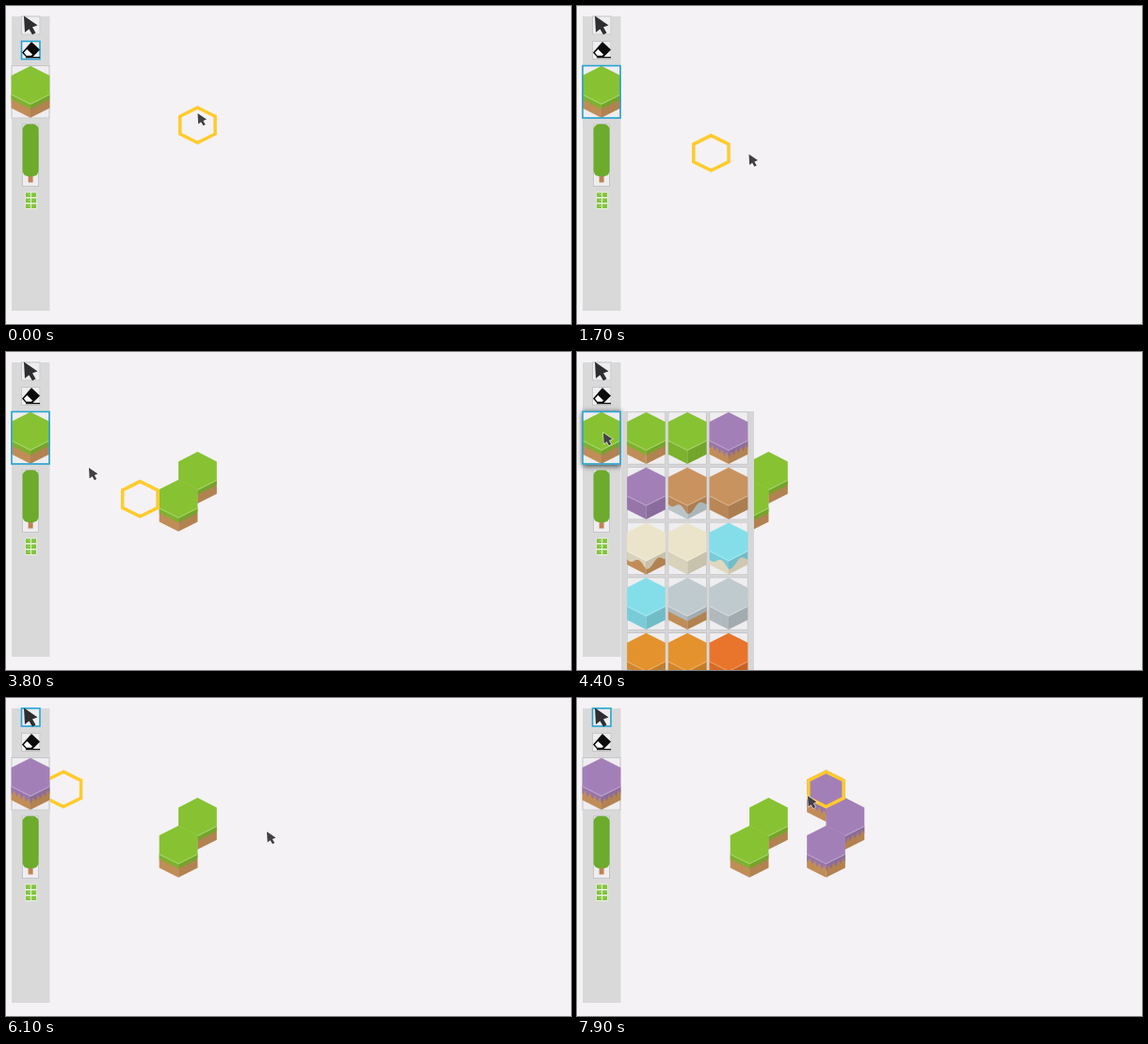
An HTML page with a canvas that plays this animation: 600x338 px, repeating every 8 s.

```html
<!DOCTYPE html>
<html>
<head>
<meta charset="utf-8">
<title>Hex tile editor</title>
<style>
html, body { margin: 0; width: 100%; height: 100%; overflow: hidden; background: #f4f2f5; }
canvas { display: block; }
</style>
</head>
<body>
<canvas id="stage" width="600" height="338"></canvas>
<script>
const ctx = document.getElementById('stage').getContext('2d');
const LOOP = 8000, STEP = 100;
const HALF = 20.35, QUARTER = 10.2, DEPTH = 14;
const BLUE = '#25a3d1';

const green = '#87c232', purple = '#a37fb8', brown = '#c9935f', cream = '#ebe4cb';
const cyan = '#84deea', gray = '#bfcacf', orange = '#e4922e', red = '#e9742b';
const soil = '#d2995f', ice = '#cbd6da', sand = '#f3ead2';

const tile = (top, base, lip) => ({ top, base, lip });
const GRASS = tile(green, soil, 'jag');
const HEATH = tile(purple, soil, 'drip');
const PALETTE = [
  GRASS, tile(green), HEATH,
  tile(purple), tile(brown, ice, 'wave'), tile(brown),
  tile(cream, soil, 'wave'), tile(cream), tile(cyan, sand, 'wave'),
  tile(cyan), tile(gray, soil, 'flat'), tile(gray),
  tile(orange, soil, 'drip'), tile(orange), tile(red)
];
const LIPS = {
  flat: () => 5,
  jag: x => 4.6 + 1.3 * Math.sin(x * 2.1),
  drip: x => 5 + 2.3 * Math.sin(x * 1.25 + 1),
  wave: x => 6 + 3.2 * Math.sin(x * 0.31 + 0.8)
};

// pointer: time, x, y
const PATH = [
  [0, 203.5, 114], [200, 160, 116], [400, 50, 98], [500, 30, 57], [600, 30, 125],
  [700, 24, 200], [1000, 37, 94], [1200, 36, 93], [1400, 70, 110], [1600, 150, 150],
  [1800, 215, 165], [2200, 185, 155], [2300, 198, 134], [2400, 197, 135], [2800, 202, 128],
  [3000, 194, 165], [3600, 166, 142], [3700, 140, 140], [3800, 88, 123], [4000, 42, 92],
  [4400, 28, 86], [4900, 112, 300], [5250, 189, 200], [5600, 160, 90], [5700, 160, 90],
  [6100, 277, 142], [6300, 264, 152], [6600, 284, 126], [6800, 264, 98], [7000, 185, 150],
  [7200, 208, 166], [7500, 284, 126], [7700, 262, 99], [7900, 245, 104]
];
// placed tiles, back to front: time, column, row, kind
const PLACED = [
  [6800, 5, 0, HEATH], [2700, 3, 1, GRASS], [6600, 5, 1, HEATH],
  [2100, 3, 2, GRASS], [6400, 5, 2, HEATH]
];
const PICK_TILE = 1200, OPEN = 4300, CLOSE = 5700, RESUME = 6200;

const cellX = (col, row) => 61 + 40.7 * col + (row % 2 ? HALF : 0);
const cellY = row => 97 + 29.6 * row;

function poly(points, fill) {
  ctx.beginPath();
  points.forEach(([x, y]) => ctx.lineTo(x, y));
  ctx.closePath();
  if (fill) { ctx.fillStyle = fill; ctx.fill(); }
}

function rect(x, y, w, h, fill) {
  ctx.fillStyle = fill;
  ctx.fillRect(x, y, w, h);
}

function hexPoints(x, y, inset = 0) {
  const w = HALF - inset, q = QUARTER - inset / 2, h = 20.5 - inset * 1.1;
  return [[x, y - h], [x + w, y - q], [x + w, y + q], [x, y + h], [x - w, y + q], [x - w, y - q]];
}

function drawTile(x, y, { top, base, lip }) {
  const edge = dx => y + 20.5 - Math.abs(dx) * 10.3 / HALF;
  for (const s of [-1, 1]) {
    const far = x + s * HALF;
    const face = [[x, edge(0) - 1], [far, edge(HALF) - 1], [far, edge(HALF) + DEPTH], [x, edge(0) + DEPTH]];
    poly(face, base || top);
    if (base) {
      const pts = [face[1], face[0]];
      for (let k = 0; k <= 40; k++) {
        const dx = s * HALF * k / 40;
        pts.push([x + dx, edge(dx) + LIPS[lip](dx)]);
      }
      poly(pts, top);
    }
    poly(face, s < 0 ? 'rgba(0,0,0,.08)' : 'rgba(0,0,0,.15)');
  }
  poly(hexPoints(x, y), top);
  ctx.beginPath();
  for (const dx of [-HALF, 0, HALF]) ctx.lineTo(x + dx, edge(dx) - 0.5);
  ctx.strokeStyle = 'rgba(255,255,255,.28)';
  ctx.lineWidth = 1.1;
  ctx.stroke();
}

function button(x, y, w, h, selected, raised) {
  ctx.save();
  if (raised) { ctx.shadowColor = 'rgba(0,0,0,.75)'; ctx.shadowBlur = 6; ctx.shadowOffsetY = 1; }
  rect(x, y, w, h, '#eeedef');
  ctx.restore();
  ctx.strokeStyle = selected ? BLUE : '#c6c6c8';
  ctx.lineWidth = selected ? 1.6 : 1;
  ctx.strokeRect(x + 0.5, y + 0.5, w - 1, h - 1);
}

const ARROW = [[0, 0], [14.5, 10], [9, 12], [12.5, 18], [9, 20], [5.5, 14], [1, 17.5]];

function arrow(x, y, size, outline) {
  poly(ARROW.map(([a, b]) => [x + a * size, y + b * size]));
  if (outline) {
    ctx.strokeStyle = 'rgba(255,255,255,.75)';
    ctx.lineWidth = 1.2;
    ctx.stroke();
  }
  ctx.fillStyle = outline ? '#414044' : '#2e2e30';
  ctx.fill();
}

function eraser() {
  poly([[27, 38], [36, 46.5], [28.5, 54], [21, 54], [17, 49.5]], '#0b0b0b');
  poly([[19, 49.4], [22.3, 46], [28, 51.4], [26.8, 52.7], [21.6, 52.7]], '#fff');
  rect(21, 54, 15, 1.3, '#0b0b0b');
}

function tree() {
  button(17, 125, 18, 67);
  rect(23.6, 176, 5, 11.5, '#bd8452');
  ctx.beginPath();
  ctx.roundRect(17.6, 125.5, 17, 55.5, 6);
  ctx.fillStyle = '#6cab2b';
  ctx.fill();
}

function gridIcon() {
  rect(20.5, 197.5, 12, 18.5, '#e9f2dc');
  for (let r = 0; r < 3; r++) {
    for (let k = 0; k < 2; k++) rect(21 + k * 6, 198.5 + r * 6, 5, 4.5, '#82c43d');
    rect(24, 200 + r * 6, 4, 1, '#b2dc85');
  }
}

const inside = (p, x, y, w, h) => p[0] >= x && p[0] < x + w && p[1] >= y && p[1] < y + h;

function sidebar(t, p) {
  const tool = t < PICK_TILE ? 'eraser' : t < CLOSE ? 'tile' : 'select';
  rect(6, 11, 40.5, 313, '#d9d9da');
  button(16, 10.5, 20.5, 20, tool === 'select');
  arrow(19, 10.5, 1, false);
  button(16, 37, 20.5, 20, tool === 'eraser');
  eraser();
  const box = [5.5, 63, 41, 56.5];
  button(...box, false, inside(p, ...box));
  drawTile(26, 84.3, t < CLOSE ? GRASS : HEATH);
  if (tool === 'tile') {
    ctx.strokeStyle = BLUE;
    ctx.lineWidth = 1.6;
    ctx.strokeRect(6, 63.5, 40, 55.5);
  }
  tree();
  gridIcon();
}

function popup(p) {
  rect(47, 63, 141, 275, '#d6d6d7');
  PALETTE.forEach((kind, i) => {
    const x = 73.5 + 43.75 * (i % 3), y = 64 + 58.7 * Math.floor(i / 3);
    const box = [x - 20.8, y - 0.8, 41.6, 56.6];
    button(...box, false, inside(p, ...box));
    drawTile(x, y + 20.5, kind);
  });
}

function pointer(t) {
  const k = PATH.findIndex(s => s[0] > t);
  if (k < 0) return PATH[PATH.length - 1].slice(1);
  const [t0, x0, y0] = PATH[k - 1], [t1, x1, y1] = PATH[k];
  const u = (t - t0) / (t1 - t0);
  return [x0 + (x1 - x0) * u, y0 + (y1 - y0) * u];
}

function nearestCell([px, py]) {
  let best = [0, 0], min = Infinity;
  for (let row = 0; row < 3; row++) {
    for (let col = 0; col < 7; col++) {
      const d = Math.hypot(px - cellX(col, row), py - cellY(row));
      if (d < min) { min = d; best = [col, row]; }
    }
  }
  return best;
}

// trails the pointer by one step and rests on the last cell left behind
function hoverCell(t) {
  let s = Math.max(0, t - STEP);
  while (s > 0 && (pointer(s)[0] < 46.5 || (s >= OPEN && s < RESUME))) s -= STEP;
  return nearestCell(pointer(s));
}

function draw(t) {
  const p = pointer(t);
  rect(0, 0, 600, 338, '#f4f2f5');
  for (const [at, col, row, kind] of PLACED) {
    if (t >= at) drawTile(cellX(col, row), cellY(row), kind);
  }
  const [col, row] = hoverCell(t);
  poly(hexPoints(cellX(col, row), cellY(row), 1.7));
  ctx.strokeStyle = '#ffcb2b';
  ctx.lineWidth = 3.5;
  ctx.stroke();
  sidebar(t, p);
  if (t >= OPEN && t < CLOSE) popup(p);
  arrow(p[0], p[1], 0.66, true);
}

const start = performance.now();
function frame() {
  const t = (performance.now() - start) % LOOP;
  draw(Math.floor(t / STEP) * STEP);
  requestAnimationFrame(frame);
}
frame();
</script>
</body>
</html>
```
